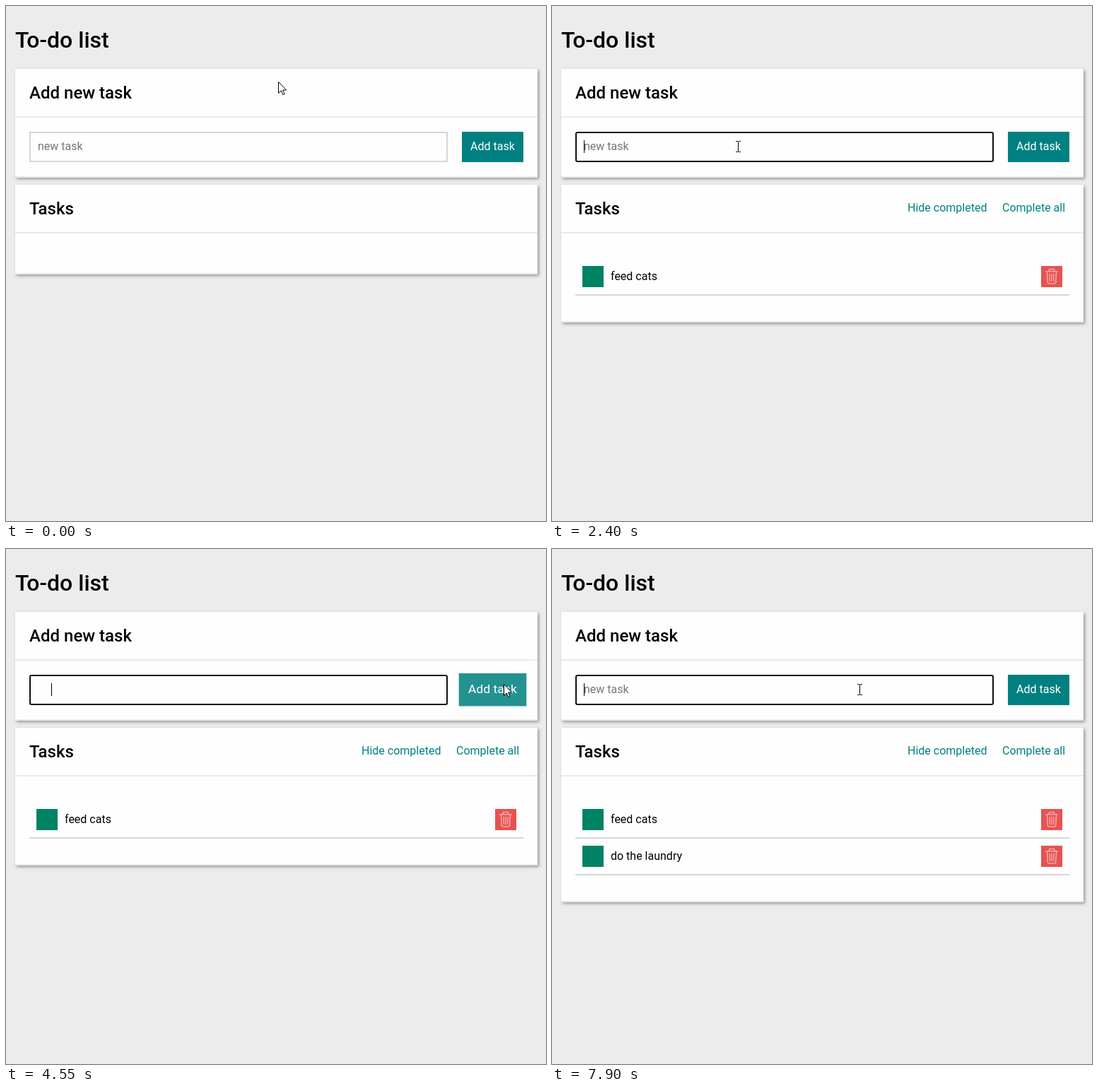
Recreate the animation shown at these times as an HTML page. Size 764 px wide and 729 px high, loop 8000 ms.

```html
<!DOCTYPE html>
<html lang="en">
<head>
<meta charset="utf-8">
<title>To-do list</title>
<style>
  html, body { margin: 0; width: 100%; height: 100%; overflow: hidden; background: #ececec; }
  svg { display: block; }
  text { font: 16px Roboto, sans-serif; white-space: pre; }
  .h1 { font-size: 32px; font-weight: 500; }
  .h2 { font-size: 24px; font-weight: 500; }
  .link { fill: #008080; }
  .card { fill: #fefefe; filter: drop-shadow(2px 2px 2px rgba(41, 51, 36, .45)); }
  .rule { fill: #e9e9e9; }
  .field { fill: none; stroke-width: 2; }
  .bin { fill: none; stroke: #f4a9a9; stroke-width: 1.5; stroke-linecap: round; stroke-linejoin: round; }
  .beam { fill: none; stroke: #000; shape-rendering: crispEdges; }
  #button { transform-box: fill-box; transform-origin: center; }
</style>
</head>
<body>
<svg width="764" height="729" viewBox="0 0 764 729">
  <defs>
    <g id="row">
      <rect x="43" y="368" width="30" height="30" fill="#008264"/>
      <rect x="692" y="368" width="30" height="30" fill="#e75252"/>
      <path class="bin" d="M698.8 375.8H715.2M703.3 375.5V373.6Q703.3 372.6 704.3 372.6H709.7Q710.7 372.6 710.7 373.6V375.5M700.4 376L701.3 391Q701.5 393 703.5 393H710.5Q712.5 393 712.7 391L713.6 376M704 379.5L704.4 389.5M707 379.5V389.5M710 379.5L709.6 389.5"/>
      <rect x="33" y="408" width="699" height="2" fill="#d5d5d5"/>
    </g>
  </defs>

  <text class="h1" x="13" y="59">To-do list</text>

  <rect class="card" x="13" y="89" width="739" height="154"/>
  <rect class="rule" x="13" y="156" width="739" height="2"/>
  <rect class="rule" x="13" y="241" width="739" height="2"/>
  <text class="h2" x="33" y="131">Add new task</text>

  <rect id="field" class="field" x="34" y="179" width="590" height="41"/>
  <text id="hint" x="45" y="204" fill="#757575">new task</text>
  <text id="typed" x="45" y="204"></text>
  <path id="wave" fill="none" stroke="#e8202a"/>
  <rect id="caret" y="190" width="1" height="18"/>

  <g id="button">
    <rect x="645" y="178" width="87" height="43" fill="#008080"/>
    <text x="657" y="204" fill="#fff">Add task</text>
  </g>

  <rect id="list" class="card" x="13" y="253" width="739" height="127"/>
  <rect class="rule" x="13" y="320" width="739" height="2"/>
  <rect id="foot" class="rule" x="13" width="739" height="2"/>
  <text class="h2" x="33" y="295">Tasks</text>
  <g id="first">
    <text class="link" x="503" y="291">Hide completed</text>
    <text class="link" x="637" y="291">Complete all</text>
    <use href="#row"/>
    <text x="83" y="388">feed cats</text>
  </g>
  <g id="second">
    <use href="#row" y="52"/>
    <text x="83" y="440">do the laundry</text>
  </g>

  <g id="mouse">
    <path id="arrow" fill="#fff" stroke="#000" d="M.5 .5V16.5L4.3 12.9L6.8 18.6L9 17.6L6.6 12H11.6Z"/>
    <path id="beam" class="beam" d="M.5 -7V7M-3 -7.5H0M1 -7.5H4M-3 7.5H0M1 7.5H4"/>
  </g>
</svg>
<script>
const LOOP = 8000, STEP = 50;
const $ = id => document.getElementById(id);
const ui = {};
for (const el of document.querySelectorAll('[id]')) ui[el.id] = el;

const FIRST = 'feed cats', SECOND = '     do the laundry';

// [time, phrase, letters shown]
const typing = [
  [0, FIRST, 0], [1450, FIRST, 1], [1550, FIRST, 3], [1650, FIRST, 4], [1750, FIRST, 5],
  [1900, FIRST, 6], [2000, FIRST, 8], [2150, FIRST, 9], [2400, SECOND, 0],
  [2650, SECOND, 1], [2750, SECOND, 2], [2850, SECOND, 3], [2950, SECOND, 4], [3050, SECOND, 5],
  [5650, SECOND, 6], [5750, SECOND, 7], [5850, SECOND, 8], [5950, SECOND, 9], [6000, SECOND, 10],
  [6150, SECOND, 11], [6250, SECOND, 12], [6400, SECOND, 13], [6500, SECOND, 14],
  [6650, SECOND, 15], [6750, SECOND, 16], [6850, SECOND, 17], [7000, SECOND, 18], [7100, SECOND, 19],
  [7450, SECOND, 0]
];
const focus = [[0, 0], [1150, 1], [4050, 0], [4300, 1]];
const caretOn = [[0, 0], [1150, 1], [3550, 0], [4550, 1], [5050, 0], [5550, 1], [7500, 0], [7900, 1]];
const rows = [[0, 0], [2400, 1], [7450, 2]];

// [time, x, y]
const path = [
  [250, 385, 107], [500, 366, 132], [800, 290, 184], [1000, 263, 199],
  [3250, 263, 199], [3450, 420, 190], [3650, 584, 202], [3850, 704, 191],
  [4750, 704, 191], [4900, 600, 202], [5200, 446, 201], [7899, 446, 201], [7900, 435, 199]
];
// [time, amount]
const hover = [[3650, 0], [3850, 1], [4000, 1], [4250, .5], [4550, 1], [4800, 1], [4950, 0]];

const last = (table, t) => table.filter(row => row[0] <= t).pop();

function tween(table, t) {
  const i = table.findIndex(row => row[0] > t);
  if (i < 0) return table[table.length - 1].slice(1);
  if (!i) return table[0].slice(1);
  const a = table[i - 1], b = table[i], k = (t - a[0]) / (b[0] - a[0]);
  return a.slice(1).map((v, n) => v + (b[n + 1] - v) * k);
}

const show = (el, on) => el.setAttribute('visibility', on ? 'visible' : 'hidden');

let zigzag = 'M45 207';
for (let x = 47, up = true; x <= 76; x += 2, up = !up) zigzag += `L${x} ${up ? 205.5 : 207}`;
ui.wave.setAttribute('d', zigzag);

function draw(t) {
  const [, phrase, count] = last(typing, t);
  ui.typed.textContent = phrase.slice(0, count).replace(/ /g, '\u00a0');
  show(ui.hint, !count);
  show(ui.wave, phrase === FIRST && count > 4);

  const active = last(focus, t)[1];
  ui.field.setAttribute('stroke', active ? '#101010' : '#d5d5d5');
  ui.field.setAttribute('rx', active ? 2 : 0);
  show(ui.caret, active && last(caretOn, t)[1]);
  ui.caret.setAttribute('x', Math.floor(45 + (count ? ui.typed.getComputedTextLength() : 0)));

  const n = last(rows, t)[1], height = [127, 195, 247][n];
  ui.list.setAttribute('height', height);
  ui.foot.setAttribute('y', 251 + height);
  show(ui.first, n > 0);
  show(ui.second, n > 1);

  const [h] = tween(hover, t);
  ui.button.style.transform = `translateY(${-.3 * h}px) scale(${1 + .1 * h}, ${1 + .08 * h})`;
  ui.button.style.opacity = 1 - .15 * h;

  const [x, y] = tween(path, t).map(Math.round);
  const inField = x >= 33 && x < 625 && y >= 178 && y < 221;
  ui.mouse.setAttribute('transform', `translate(${x} ${y})`);
  show(ui.arrow, !inField);
  show(ui.beam, inField);
}

const start = performance.now();
function tick() {
  const t = (performance.now() - start) % LOOP;
  draw(Math.floor(t / STEP) * STEP);
  requestAnimationFrame(tick);
}
tick();
</script>
</body>
</html>
```
